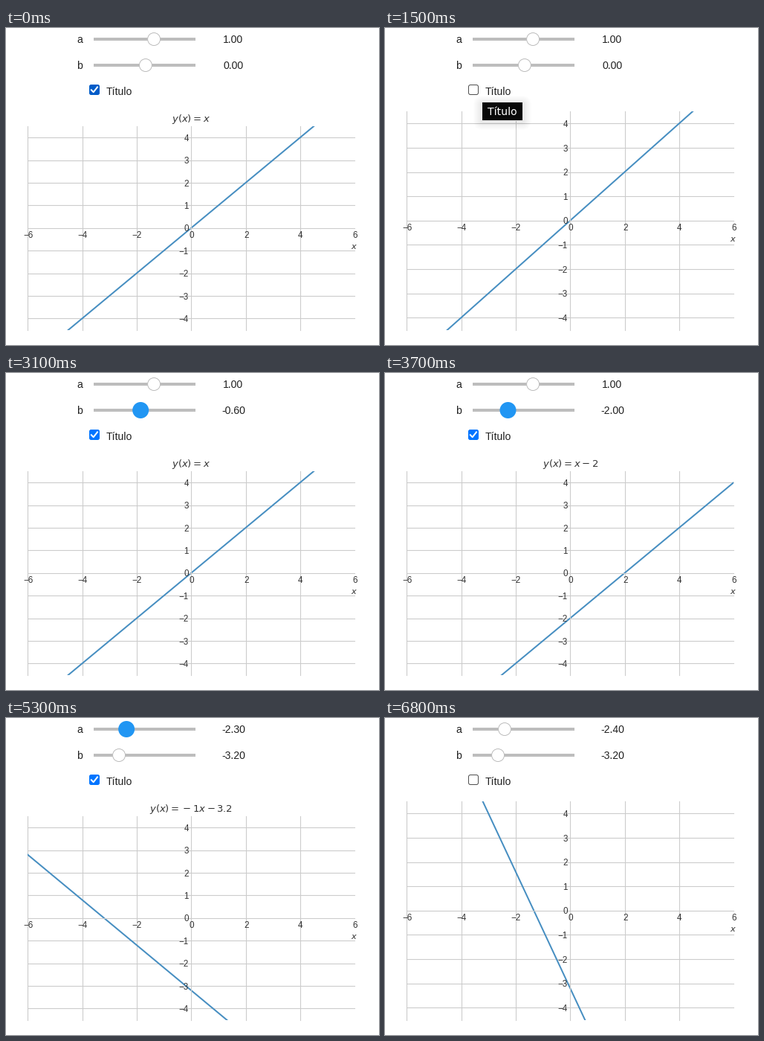
A matplotlib script for the animation above (7500 ms loop, 502x426 px).

```python
import matplotlib.pyplot as plt
import numpy as np
from matplotlib.animation import FuncAnimation
from matplotlib.patches import Circle, FancyBboxPatch, Rectangle

W, H, DPI = 502, 426, 64
PX = 72 / DPI  # points per pixel
STEP, LOOP = 100, 7500

INK, PLOT_INK, GREY = "#212121", "#333333", "#cccccc"
TRACK, ACTIVE, CURVE = "#bdbdbd", "#2196f3", "#468ec1"
SANS, MATH = "Liberation Sans", "DejaVu Sans"
BOX_FILL = {"idle": "#0075ff", "hover": "#005cc8", "press": "#3793ff"}
BOX_EDGE = {"idle": "#767676", "hover": "#4f4f4f", "press": "#8d8d8d"}

CLICKS = (500, 1600, 6600)  # presses on the checkbox, in ms

fig = plt.figure(figsize=(W / DPI, H / DPI), dpi=DPI, facecolor="white")
ax = fig.add_axes([0, 0, 1, 1])


def glide(t, *keys):
    """Move linearly between (ms, value) keys, in slider steps of 0.1."""
    times, values = zip(*keys)
    return round(float(np.interp(t, times, values)), 1) + 0.0


def knob_mode(t, hover, drag):
    if drag[0] <= t < drag[1]:
        return "drag"
    return "hover" if hover[0] <= t < hover[1] else "idle"


def toggled(t, delay):
    """The box starts ticked and flips a moment after each press."""
    return sum(click + delay <= t for click in CLICKS) % 2 == 0


def box_mode(t):
    if any(click <= t < click + STEP for click in CLICKS):
        return "press"
    return "idle" if 2000 <= t < 6100 else "hover"


def label(x, y, text, size, color=INK, font=SANS, ha="left", z=5):
    ax.text(x, y, text, fontsize=size * PX, color=color, family=font,
            ha=ha, va="baseline", zorder=z)


def stroke(xs, ys, color, width, z):
    return ax.plot(xs, ys, color=color, lw=width * PX, zorder=z)[0]


def rounded(x, y, w, h, r, z=5, **style):
    ax.add_patch(FancyBboxPatch((x, y), w, h, zorder=z,
                                boxstyle=f"round,pad=0,rounding_size={r}", **style))


def draw_slider(y, name, value, mode):
    label(95, y + 5, name, 14)
    ax.add_patch(Rectangle((118, y - 2), 137, 4, fc=TRACK, lw=0))
    x = 187.9 + 11.2 * value
    if mode == "idle":
        ax.add_patch(Circle((x, y), 8.5, fc="white", ec=TRACK, lw=PX, zorder=4))
    else:
        radius = 11 if mode == "drag" else 9
        ax.add_patch(Circle((x, y), radius, fc=ACTIVE, lw=0, zorder=4))
    label(305.9, y + 5, f"{value:.2f}", 14, ha="center")


def draw_checkbox(checked, mode):
    if checked:
        rounded(112, 76, 14, 14, 2.5, fc=BOX_FILL[mode], lw=0)
        stroke([114.8, 117.7, 123], [83.2, 86.2, 79.4], "white", 2, 6)
    else:
        rounded(112.5, 76.5, 13, 13, 2.5, fc="white", ec=BOX_EDGE[mode], lw=PX)
    label(135, 90, "Título", 14)


def draw_tooltip():
    for grow in range(1, 13):
        rounded(131 - grow, 103 - grow, 54 + 2 * grow, 22 + 2 * grow, grow + 1,
                z=7, fc="black", alpha=.009, lw=0)
    ax.add_patch(Rectangle((130, 99), 56, 26, fc="#e8e8e8", lw=0, zorder=8))
    ax.add_patch(Rectangle((131, 100), 54, 24, fc="#080808", lw=0, zorder=8))
    label(138, 117, "Título", 14, "white", MATH, z=9)


def formula(a, b):
    slope = "x" if a == 1 else f"{a:g}x" if a >= 0 else f"{{}} - {-a:g}x"
    shift = f" - {-b:g}" if b else ""
    return f"$y(x) = {slope}{shift}$"


def draw_plot(a, b, titled):
    top, bottom, left, right = (132 if titled else 112), 405.5, 29.2, 469.2
    unit_x, unit_y = (right - left) / 12, (bottom - top) / 9
    x0, y0 = (left + right) / 2, (top + bottom) / 2

    def tick(x, y, k, ha):
        label(x, y, f"{k}".replace("-", "−"), 11.6, PLOT_INK, ha=ha)

    for k in range(-6, 7, 2):
        x = x0 + k * unit_x
        if k < 6:
            stroke([x, x], [top, bottom], GREY, 1.1, 2.5 if k == 0 else 1)
        tick(x + .6, y0 + 13.5, k, "center")
    for k in range(-4, 5):
        y = y0 - k * unit_y
        stroke([left, right], [y, y], GREY, 1.1, 2.5 if k == 0 else 1)
        tick(246, y + 4.6, k, "right")
    label(469, y0 + 28.5, "$x$", 11.4, PLOT_INK, MATH, "center")

    ends = np.array([-6, 6])
    line = stroke(x0 + ends * unit_x, y0 - (a * ends + b) * unit_y, CURVE, 2, 2)
    line.set_clip_path(Rectangle((left, top), right - left, bottom - top,
                                 transform=ax.transData))
    if titled:
        label(x0, 126, formula(a, b), 13.15, PLOT_INK, MATH, "center")


def draw(frame):
    t = frame * STEP
    a = glide(t, (4800, 1), (5300, -2.3), (5500, -2.3), (5600, -2.4))
    b = glide(t, (3000, 0), (3100, -.6), (3600, -1.1), (3700, -2), (4200, -3.2))
    # The curve trails the sliders.
    plot_a = glide(t, (4900, 1), (5500, -2), (5700, -2.4))
    plot_b = glide(t, (3100, 0), (3500, -1.1), (3600, -1.1), (3700, -2), (4300, -3.2))

    ax.clear()
    ax.set(xlim=(0, W), ylim=(H, 0))
    ax.axis("off")
    draw_slider(15, "a", a, knob_mode(t, hover=(4500, 6500), drag=(4800, 5800)))
    draw_slider(50, "b", b, knob_mode(t, hover=(2700, 4800), drag=(2900, 4300)))
    draw_checkbox(toggled(t, STEP), box_mode(t))
    draw_plot(plot_a, plot_b, toggled(t, 2 * STEP))
    if 1500 <= t < CLICKS[1]:
        draw_tooltip()
    return []


anim = FuncAnimation(fig, draw, frames=LOOP // STEP, interval=STEP,
                     init_func=lambda: [], repeat=True, repeat_delay=0)
plt.show()
```
